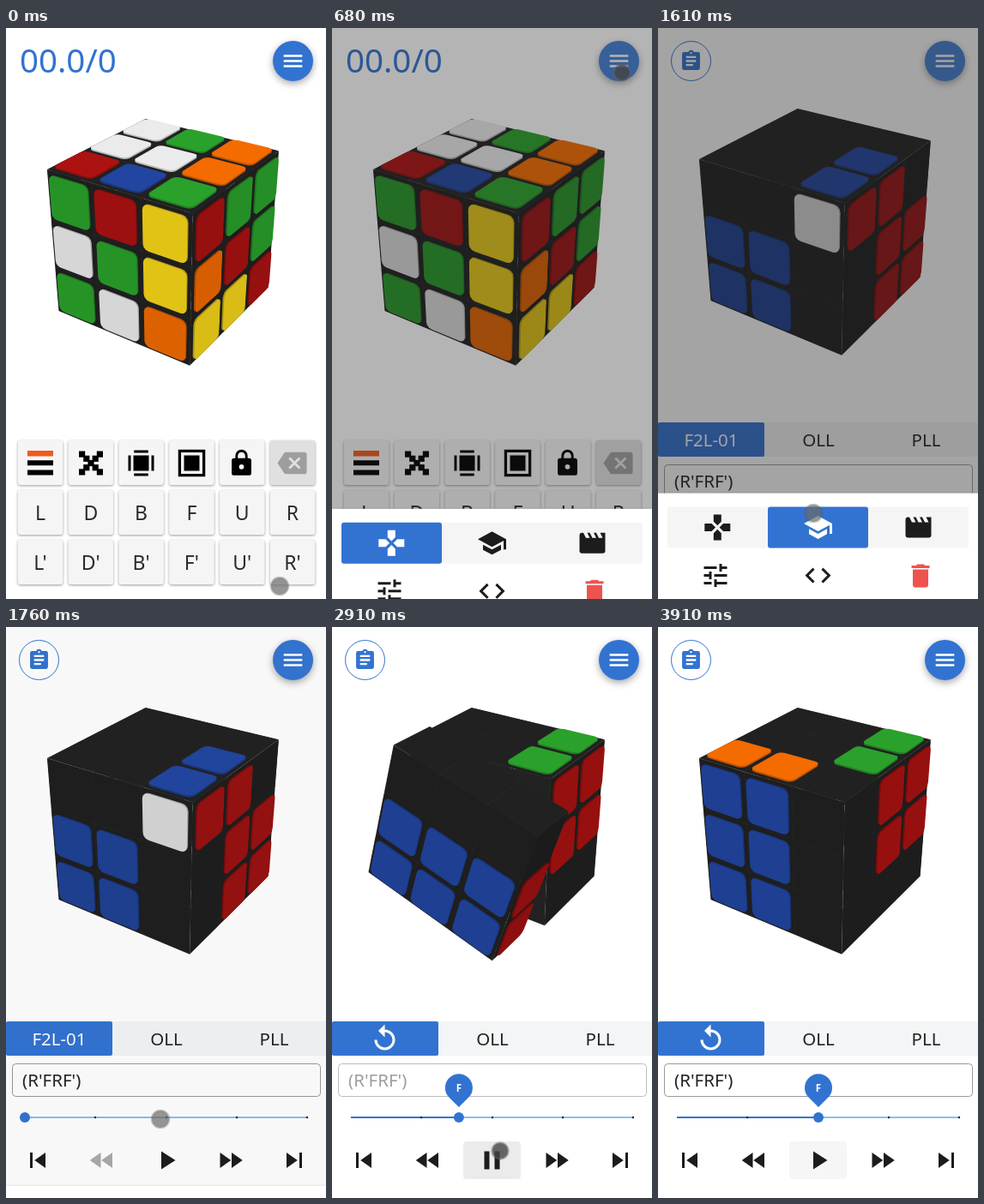
Recreate the animation shown at these times as an HTML page. Size 373 by 666 pixels, loop 4460 ms.

```html
<!DOCTYPE html>
<html lang="en">
<head>
<meta charset="utf-8">
<title>Cube trainer</title>
<style>
html, body { margin: 0; width: 100%; height: 100%; overflow: hidden; background: #fff; }
svg { display: block; width: 100vw; height: 100vh; }
text { font-family: "Noto Sans", "Open Sans", sans-serif; }
.key, #sheet { filter: drop-shadow(0 1px 1.5px rgba(0,0,0,.4)); }
.fab { filter: drop-shadow(0 3px 4px rgba(0,0,0,.35)); }
</style>
</head>
<body>
<svg id="stage" viewBox="0 0 373 666"></svg>
<script>
const BLUE = '#3273d2', INK = '#1c1c1c';
const DURATION = 4460, STEP = DURATION / 58;

const ICONS = {
  menu: 'M3 6h18v2H3V6m0 5h18v2H3v-2m0 5h18v2H3v-2z',
  clipboard: 'M17 9H7V7h10M17 13H7v-2h10M14 17H7v-2h7M12 3a1 1 0 0 1 0 2a1 1 0 0 1 0-2M19 3h-4.2a3 3 0 0 0-5.6 0H5a2 2 0 0 0-2 2v14a2 2 0 0 0 2 2h14a2 2 0 0 0 2-2V5a2 2 0 0 0-2-2z',
  gamepad: 'M16.5 9l-3 3 3 3H22V9M9 16.5V22h6v-5.5l-3-3M7.5 9H2v6h5.5l3-3M15 7.5V2H9v5.5l3 3z',
  school: 'M12 3L1 9l11 6 9-4.9V17h2V9M5 13.2v4L12 21l7-3.8v-4L12 17z',
  movie: 'M18 4l2 4h-3l-2-4h-2l2 4h-3l-2-4H8l2 4H7L5 4H4a2 2 0 0 0-2 2v12a2 2 0 0 0 2 2h16a2 2 0 0 0 2-2V4z',
  tune: 'M3 17v2h6v-2M3 5v2h10V5M13 21v-2h8v-2h-8v-2h-2v6M7 9v2H3v2h4v2h2V9M21 13v-2H11v2M15 9h2V7h4V5h-4V3h-2z',
  code: 'M14.6 16.6l4.6-4.6-4.6-4.6L16 6l6 6-6 6M9.4 16.6L4.8 12l4.6-4.6L8 6l-6 6 6 6z',
  trash: 'M19 4h-3.5l-1-1h-5l-1 1H5v2h14M6 19a2 2 0 0 0 2 2h8a2 2 0 0 0 2-2V7H6z',
  lock: 'M12 17a2 2 0 0 0 0-4a2 2 0 0 0 0 4M18 8a2 2 0 0 1 2 2v10a2 2 0 0 1-2 2H6a2 2 0 0 1-2-2V10a2 2 0 0 1 2-2h1V6a5 5 0 0 1 10 0v2M12 3a3 3 0 0 0-3 3v2h6V6a3 3 0 0 0-3-3z',
  erase: 'M22 3H7Q6 3 5.4 3.9L0 12l5.4 8.1Q6 21 7 21h15a2 2 0 0 0 2-2V5a2 2 0 0 0-2-2M19 15.6L17.6 17 14 13.4 10.4 17 9 15.6l3.6-3.6L9 8.4 10.4 7l3.6 3.6L17.6 7 19 8.4 15.4 12z',
  replay: 'M12 5V1L7 6l5 5V7a6 6 0 1 1-6 6H4a8 8 0 1 0 8-8z',
  first: 'M6 6h2v12H6m3.5-6l8.5 6V6z',
  rewind: 'M11 18V6l-8.5 6m9 0l8.5 6V6z',
  play: 'M8 5v14l11-7z',
  pause: 'M14 19h4V5h-4M6 19h4V5H6z',
  forward: 'M13 6v12l8.5-6M4 18l8.5-6L4 6z',
  last: 'M16 18h2V6h-2M6 18l8.5-6L6 6z',
  bars: 'M2 10h20v4H2M2 17.5h20v4H2z',
  shell: 'M6 6h12v12H6M6.5 2h11v2h-11M6.5 20h11v2h-11M2 6h2v12H2M20 6h2v12h-2z',
  framed: 'M1.5 1.5h21v21h-21M3.7 3.7v16.6h16.6V3.7M6 6h12v12H6z'
};

// ---- markup helpers ----
const rect = (x, y, w, h, fill, more = '') =>
  `<rect x="${x}" y="${y}" width="${w}" height="${h}" fill="${fill}" ${more}/>`;
const text = (x, y, size, fill, str, more = 'text-anchor="middle"') =>
  `<text x="${x}" y="${y}" font-size="${size}" fill="${fill}" ${more}>${str}</text>`;
const icon = (name, x, y, fill = INK, scale = 1.5) =>
  `<path id="${name}" d="${ICONS[name]}" fill="${fill}" fill-rule="evenodd" transform="translate(${x} ${y}) scale(${scale}) translate(-12 -12)"/>`;

function keyboard() {
  const letters = [...'LDBFUR'];
  const labels = [[], letters, letters.map(c => c + "'")];
  let out = '';
  labels.forEach((row, r) => {
    for (let c = 0; c < 6; c++) {
      const x = 13.8 + c * 58.8, y = 481 + r * 58;
      out += rect(x, y, 52.5, 52, r === 0 && c === 5 ? '#e0e0e0' : '#f5f5f5', 'rx="3" class="key"');
      if (row[c]) out += text(x + 26.2, y + 35, 23, '#2a2a2a', row[c]);
    }
  });
  for (let r = 0; r < 5; r++)
    for (let c = 0; c < 5; c++)
      if (r === c || r + c === 4) out += rect(85 + c * 5.2, 493.5 + r * 5.2, 7.2, 7.2, '#000');
  return out + rect(25, 493, 30, 6.5, '#f05a1e') + icon('bars', 40, 507.3, '#000') +
    icon('shell', 157.5, 507.5, '#000') + icon('framed', 216.5, 507.5, '#000') +
    icon('lock', 274.5, 507.5, '#000', 1.43) + icon('erase', 333.5, 507.5, '#9e9e9e', 1.42);
}

function trainer() {
  const ticks = [104, 187, 269, 351].map(x => `<circle cx="${x}" cy="572" r="1.2" fill="#123"/>`).join('');
  return `<circle cx="38.5" cy="38.5" r="23" fill="#fff" stroke="${BLUE}"/>` +
    icon('clipboard', 38.5, 38.5, BLUE, 1.16) +
    rect(0, 460, 373, 40, '#f4f5f6') + rect(0, 460, 124, 40, BLUE, 'rx="2"') +
    text(62, 487.5, 20.5, '#fff', 'F2L-01', 'id="tab" text-anchor="middle" font-weight="500"') +
    icon('replay', 61.5, 480, '#fff') +
    text(187, 487.5, 20.5, '#222', 'OLL') + text(312.5, 487.5, 20.5, '#222', 'PLL') +
    rect(7.5, 509.5, 359, 38, '#fff', 'rx="4" id="field"') +
    text(19, 536, 20.5, '#222', "(R'FRF')", 'id="formula"') +
    rect(22, 571, 329, 2, '#8abff2') + rect(22, 571, 0, 2, BLUE, 'id="track"') + ticks +
    `<g id="thumb"><circle cy="572" r="6" fill="${BLUE}"/><g id="pin">
     <path d="M0 0L-11.3-11.3A16 16 0 1 1 11.3-11.3Z" fill="${BLUE}"/>` +
    text(0, -18.5, 11.5, '#fff', '', 'id="pinText" text-anchor="middle" font-weight="600"') + '</g></g>' +
    rect(153, 600, 67, 44, '#000', 'rx="4" id="press"') +
    icon('first', 37, 622) + icon('rewind', 112, 622) + icon('play', 187, 622) + icon('pause', 186.5, 622) +
    icon('forward', 261.5, 622) + icon('last', 336, 622);
}

function sheet() {
  return rect(0, 530, 373, 150, '#fff') + rect(11, 546, 351, 48, '#f5f5f5', 'rx="3"') +
    rect(11, 546, 117, 48, BLUE, 'rx="3" id="active"') +
    icon('gamepad', 69.3, 570) + icon('school', 186.5, 570) + icon('movie', 303.5, 570) +
    icon('tune', 67, 626) + icon('code', 186.5, 626) + icon('trash', 306, 626.5, '#ef5350');
}

const stage = document.getElementById('stage');
stage.innerHTML = rect(0, 0, 373, 666, '#fff') + '<g id="cube"></g>' +
  `<g id="solve">${text(16, 52, 38.5, BLUE, '00.0/0', '')}${keyboard()}</g>` +
  `<g id="learn">${trainer()}</g>` +
  `<circle cx="334.5" cy="38.5" r="23.5" fill="${BLUE}" class="fab"/>` +
  '<circle id="focus" cx="334.5" cy="38.5" r="23.5" fill="#fff"/>' + icon('menu', 334.5, 38.5, '#fff', 1.2) +
  rect(0, 0, 373, 666, '#212121', 'id="shade"') + `<g id="sheet">${sheet()}</g>` +
  '<circle id="pointer" stroke-width="2.5" stroke-opacity=".5"/>';

const el = {};
stage.querySelectorAll('[id]').forEach(node => { el[node.id] = node; });
const set = (id, attrs) => { for (const k in attrs) el[id].setAttribute(k, attrs[k]); };
const show = (id, on) => set(id, { visibility: on ? 'inherit' : 'hidden' });

// ---- cube ----
// Each face: normal, direction of columns, direction of rows.
const FACES = {
  U: [[0, 1, 0], [1, 0, 0], [0, 0, 1]], F: [[0, 0, 1], [1, 0, 0], [0, -1, 0]],
  R: [[1, 0, 0], [0, 0, -1], [0, -1, 0]], L: [[-1, 0, 0], [0, 0, 1], [0, -1, 0]],
  B: [[0, 0, -1], [-1, 0, 0], [0, -1, 0]], D: [[0, -1, 0], [1, 0, 0], [0, 0, -1]]
};
const SCRAMBLED = { U: 'wgowworbg', F: 'grywgygwo', R: 'rggorgyyr', L: 'bwgooyrbw', B: 'rbwbbyoog', D: 'rooyyyggb' };
const SLOT = { U: '.....b..b', F: '..wbb.bb.', R: 'rr..rr.rr', L: '...oooooo', B: '...gggggg', D: 'ww.wwwwww' };
const PAINT = { w: [235, 235, 235], g: [42, 161, 43], o: [244, 107, 0], r: [172, 18, 18], y: [247, 214, 24], b: [33, 69, 160], '.': [33, 33, 33] };
const EYE = [4.657, 4.657, 6.985];
const STICKER = 0.289, RAISE = 0.03;

const mix = (p, ...terms) => p.map((v, i) => terms.reduce((s, [q, k]) => s + q[i] * k, v));
const dot = (a, b) => a[0] * b[0] + a[1] * b[1] + a[2] * b[2];
const same = p => p;
function turnR([x, y, z], a) {
  const c = Math.cos(a), s = Math.sin(a);
  return [x, y * c - z * s, z * c + y * s];
}
function turnF([x, y, z], a) {
  const c = Math.cos(a), s = Math.sin(a);
  return [x * c + y * s, y * c - x * s, z];
}
function project([x, y, z], cy) {
  const k = 887 / (9.6 - 0.4851 * x - 0.4851 * y - 0.7276 * z);
  const px = 186.5 + k * (0.832 * x - 0.5547 * z);
  const py = cy - k * (-0.2691 * x + 0.8747 * y - 0.4036 * z);
  return px.toFixed(1) + ' ' + py.toFixed(1);
}
const faces = (n, p) => dot(n, mix(EYE, [p, -1])) > 0;
const lit = (rgb, n, k = 1) =>
  `rgb(${rgb.map(v => Math.round(Math.min(255, v * k * (0.8 + 0.08 * n[0] + 0.2 * n[1] + 0.11 * n[2]))))})`;
const polygon = (points, fill, cy) => `<path d="M${points.map(p => project(p, cy)).join('L')}Z" fill="${fill}"/>`;

function roundedSquare({ centre, n, u, v }, half, radius, raise) {
  const points = [];
  for (let i = 0; i < 16; i++) {
    const corner = i >> 2, a = (corner + (i % 4) / 3) * Math.PI / 2;
    const sx = corner === 0 || corner === 3 ? 1 : -1, sy = corner < 2 ? 1 : -1;
    points.push(mix(centre, [n, raise],
      [u, sx * (half - radius) + radius * Math.cos(a)], [v, sy * (half - radius) + radius * Math.sin(a)]));
  }
  return points;
}

function drawSlab(tiles, lo, hi, spin, cy) {
  let hidden = '', body = '', front = '';
  for (const [n, u, v] of Object.values(FACES)) {
    const corners = [[-1, -1], [1, -1], [1, 1], [-1, 1]].map(([a, b]) =>
      spin(mix(n, [u, a], [v, b]).map((s, i) => s > 0 ? hi[i] : lo[i])));
    const normal = spin(n);
    if (faces(normal, corners[0])) body += polygon(corners, lit([37, 37, 37], normal), cy);
  }
  for (const tile of tiles) {
    const sticker = tile.color !== '.', rgb = PAINT[tile.color];
    const top = roundedSquare(tile, STICKER, 0.075, RAISE);
    if (!faces(tile.n, tile.centre)) {
      if (sticker) hidden += polygon(top, lit(rgb, tile.n, 1.1), cy);
      continue;
    }
    front += polygon(roundedSquare(tile, 0.326, 0.03, 0), lit(PAINT['.'], tile.n), cy);
    if (sticker) front += polygon(roundedSquare(tile, STICKER, 0.075, RAISE / 3), lit(rgb, tile.n, 0.78), cy) +
      polygon(top, lit(rgb, tile.n), cy);
  }
  return hidden + body + front;
}

function drawCube(colors, r, f, cy) {
  const axis = r > 0 && r < 1 ? 0 : f > 0 && f < 1 ? 2 : -1;
  const aR = r * Math.PI / 2, aF = f * Math.PI / 2, still = [], moving = [];
  for (const face in FACES) {
    const [n, u, v] = FACES[face];
    [...colors[face]].forEach((color, i) => {
      const home = mix(n, [u, (i % 3 - 1) * 2 / 3], [v, (Math.floor(i / 3) - 1) * 2 / 3]);
      const spinR = home[0] > 0.5 ? p => turnR(p, aR) : same;
      const inFront = spinR(home)[2] > 0.5;
      const spin = inFront && f > 0 ? p => turnF(spinR(p), aF) : spinR;
      const tile = { centre: spin(home), n: spin(n), u: spin(u), v: spin(v), color };
      const turning = axis === 0 ? home[0] > 0.5 : axis === 2 && inFront;
      (turning ? moving : still).push(tile);
    });
  }
  const lo = [-1, -1, -1], hi = [1, 1, 1];
  if (axis < 0) return drawSlab(still, lo, hi, same, cy);
  const cut = (corner, i) => corner.map((s, k) => k === i ? 1 / 3 : s);
  return drawSlab(still, lo, cut(hi, axis), same, cy) +
    drawSlab(moving, cut(lo, axis), hi, p => axis === 0 ? turnR(p, aR) : turnF(p, aF), cy);
}

// ---- timeline ----
const ramp = (t, a, b) => Math.max(0, Math.min(1, (t - a) / (b - a)));
const easeOut = (p, power = 3) => 1 - (1 - p) ** power;
const easeInOut = p => (1 - Math.cos(Math.PI * p)) / 2;
const PATH = [
  [0, 319, 651], [77, 332, 330], [154, 350, 84], [300, 350, 84], [460, 338, 52], [900, 338, 52],
  [1150, 254, 410], [1225, 182, 560], [1500, 182, 560], [1769, 180, 574], [2000, 197, 610],
  [2540, 197, 610], [3300, 195, 612], [3780, 195, 612], [3840, 232, 630]
];
function pointerAt(t) {
  const i = PATH.findIndex(key => key[0] > t);
  if (i < 0) return PATH[PATH.length - 1].slice(1);
  const [t0, x0, y0] = PATH[i - 1], [t1, x1, y1] = PATH[i], p = (t - t0) / (t1 - t0);
  return [x0 + (x1 - x0) * p, y0 + (y1 - y0) * p];
}

let cubeKey = '';
function render(t) {
  const learning = t >= 1460, playing = t >= 2220 && t < 3390, started = t >= 2220;
  show('solve', !learning);
  show('learn', learning);

  const pR = ramp(t, 2241, 2741), pF = ramp(t, 2780, 3280);
  const key = [learning, pR, pF].join();
  if (key !== cubeKey) {
    cubeKey = key;
    el.cube.innerHTML = drawCube(learning ? SLOT : SCRAMBLED, easeInOut(pR), easeInOut(pF), learning ? 227 : 239);
  }

  const x = 22 + 82 * easeOut(pR, 2.25) + 83 * easeOut(pF, 2.25);
  set('track', { width: x - 22 });
  set('thumb', { transform: `translate(${x})` });
  set('pin', { transform: `translate(0 560) scale(${easeOut(ramp(t, 2300, 2650), 2)})` });
  el.pinText.textContent = t < 2780 ? "R'" : 'F';
  show('tab', !started);
  show('replay', started);
  show('play', !playing);
  show('pause', playing);
  set('rewind', { fill: started ? INK : '#aaa' });
  set('field', { stroke: playing ? '#bdbdbd' : '#999' });
  set('formula', { fill: playing ? '#9e9e9e' : '#222' });
  const ripple = 0.25 * ramp(t, 2100, 2300) - 0.215 * ramp(t, 2600, 3000);
  const tap = t >= 3390 ? 0.1 * (1 - ramp(t, 3480, 3610)) : 0;
  set('press', { opacity: ripple + tap });

  const open = easeOut(ramp(t, 575, 875)) - easeOut(ramp(t, 1605, 1915));
  set('shade', { opacity: 0.46 * open ** 1.2 });
  show('sheet', open > 0);
  set('sheet', { transform: `translate(0 ${136 * (1 - open)})` });
  set('active', { x: learning ? 128 : 11 });
  set('gamepad', { fill: learning ? INK : '#fff' });
  set('school', { fill: learning ? '#fff' : INK });
  set('focus', { opacity: 0.1 * open });

  const [cx, cy] = pointerAt(t);
  const down = (t > 500 && t < 850) || (t > 1290 && t < 1480) || (t > 2070 && t < 3810);
  show('pointer', t < 3900);
  set('pointer', {
    cx, cy, r: down ? 9.5 : 10, opacity: down ? 0.8 : 0.7,
    fill: down ? '#444' : '#6a6a6a', stroke: down ? '#666' : '#5c5c5c'
  });
}

function tick() {
  const now = performance.now() % DURATION;
  render(Math.floor((now + 13) / STEP) * STEP);
  requestAnimationFrame(tick);
}
tick();
</script>
</body>
</html>
```
